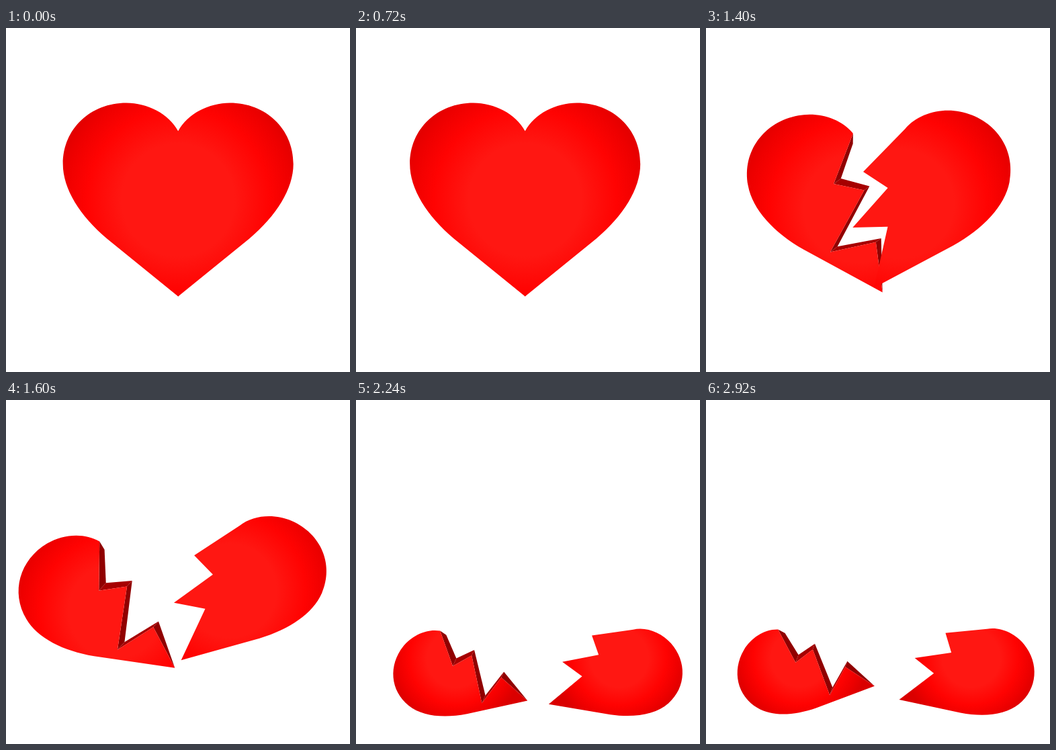
Animation of 512 by 512 pixels, one loop 3.2 s. Source, as an HTML page with a canvas:

```html
<!DOCTYPE html>
<html lang="en">
<head>
<meta charset="utf-8">
<title>Breaking heart</title>
<style>
  html, body { margin: 0; width: 100%; height: 100%; overflow: hidden; background: #fff; }
  canvas { display: block; width: 100vw; height: 100vh; }
</style>
</head>
<body>
<canvas id="stage" width="512" height="512"></canvas>
<script>
const ctx = document.getElementById('stage').getContext('2d');
const LOOP = 3200, STEP = 40, LAST = 2920;
const BREAK = 1120, SPLIT = 480;
const TIP = { x: 256.2, y: 399.5 };
const LOBE = { x: 85, y: -200 };
const ROCK = { half: 285, decay: 0.0035 };

// Shapes are measured from the tip of the heart; cracks run from notch to tip.
// drift, drop, turn and shrink are reached SPLIT ms after the break.
const pieces = [
  {
    side: -1, drift: 76, drop: 85, turn: 30.8, shrink: 0.11, power: 2,
    land: 1768, peak: 1920, swing: 27.3,
    rest: { x: 105, y: 407, lean: 59.6, scale: 0.677 },
    crack: [[0, -246], [-43, -176], [1, -158], [-67, -75], [4, -77], [0, 0]]
  },
  {
    side: 1, drift: 59.5, drop: 55, turn: 23.5, shrink: 0.112, power: 1.4,
    land: 1871, peak: 2062, swing: 17,
    rest: { x: 431, y: 405.5, lean: 52, scale: 0.682 },
    crack: [[0, -246], [-50, -170], [-8.5, -153], [-49.5, -83.5], [2.7, -95], [0, 0]]
  }
];

const lerp = (a, b, k) => a + (b - a) * k;
const clamp = v => Math.max(0, Math.min(1, v));

function halfPath(side, crack) {
  const p = new Path2D(), k = side;
  p.moveTo(0, 0);
  p.lineTo(106 * k, -86);
  p.bezierCurveTo(146 * k, -120, 171.5 * k, -160, 171.5 * k, -197);
  p.bezierCurveTo(171.5 * k, -250, 130 * k, -288, 77 * k, -288);
  p.bezierCurveTo(46 * k, -288, 14 * k, -272, 0, -246);
  crack.forEach(([x, y]) => p.lineTo(x, y));
  p.closePath();
  return p;
}

for (const p of pieces) {
  p.path = halfPath(p.side, p.crack);
  // The unbroken halves overlap a little so that no seam shows.
  p.whole = halfPath(p.side, [[-p.side, -246], [-p.side, -1]]);
}

function glow(x, y, r) {
  const g = ctx.createRadialGradient(x, y, 0, x, y, r);
  g.addColorStop(0.42, '#ff1712');
  g.addColorStop(0.68, '#ff0302');
  g.addColorStop(0.85, '#ee0000');
  g.addColorStop(1, '#da0000');
  return g;
}

function fillPath(path, matrix, paint) {
  const p = new Path2D();
  p.addPath(path, matrix);
  ctx.fillStyle = paint;
  ctx.fill(p);
}

// Two sways, the second one slower and weaker.
function sway(t) {
  const wave = (size, from, period) => -size * Math.sin(2 * Math.PI * (t - from) / period);
  return t < 480 ? wave(13.7, 0, 480) : wave(6.4, 480, 640);
}

function fallPose({ side, drift, drop, turn, shrink, power, rest }, t) {
  const u = (t - BREAK) / SPLIT, spin = u ** power, fall = u ** 3;
  return {
    x: TIP.x + side * (LOBE.x + Math.min(82, drift * spin)),
    y: Math.min(rest.y, TIP.y + LOBE.y + drop * fall),
    lean: turn * spin,
    scale: Math.max(rest.scale, 1 - shrink * fall)
  };
}

// A round lobe rocking on the ground until it settles.
function rockPose({ side, peak, swing, rest }, t) {
  const dt = t - peak;
  const roll = swing * Math.exp(-ROCK.decay * Math.max(0, dt)) * Math.cos(Math.PI * dt / ROCK.half);
  return {
    x: rest.x + side * roll * 1.04,
    y: rest.y + 0.12 * Math.abs(roll),
    lean: rest.lean + roll,
    scale: rest.scale
  };
}

function poseAt(piece, t) {
  const a = fallPose(piece, t), b = rockPose(piece, t), k = clamp((t - piece.land) / 50);
  const pose = {};
  for (const key in a) pose[key] = lerp(a[key], b[key], k);
  return pose;
}

// Cut faces running back from the front edge of the crack; the teeth are thinner.
function drawCut(crack, matrix, { lean, scale }) {
  const grow = clamp(lean / 15);
  const dx = (11 - 0.12 * lean) * scale / 0.68 * grow, dy = -10.5 * grow;
  const front = crack.map(([x, y]) => matrix.transformPoint(new DOMPoint(x, y)));
  const back = front.map((p, i) => {
    const depth = i % 2 ? 1.1 : 0.8;
    return { x: p.x + dx * depth, y: p.y + dy * depth };
  });
  const end = front.length - 1;
  back[0].x += (front[1].x - front[0].x) * 0.28;
  back[0].y += (front[1].y - front[0].y) * 0.28;
  back[end] = front[end];
  for (let i = 0; i < end; i++) {
    ctx.beginPath();
    [front[i], front[i + 1], back[i + 1], back[i]].forEach(p => ctx.lineTo(p.x, p.y));
    ctx.closePath();
    ctx.fillStyle = i % 2 ? '#a60000' : '#900000';
    ctx.fill();
  }
}

function drawPiece(piece, t) {
  const { side, crack, path } = piece;
  const pose = poseAt(piece, t), { x, y, lean, scale } = pose;
  const matrix = new DOMMatrix().translate(x, y).rotate(side * lean).scale(scale)
    .translate(-side * LOBE.x, -LOBE.y);
  if (side < 0) drawCut(crack, matrix, pose);
  const k = (1 - scale) / 0.32;
  const paint = glow(x - side * lerp(85, 35, k), y + lerp(57, -22, k), lerp(200, 102, k));
  fillPath(path, matrix, paint);
}

function draw(t) {
  ctx.fillStyle = '#fff';
  ctx.fillRect(0, 0, 512, 512);
  if (t > BREAK) {
    pieces.forEach(p => drawPiece(p, t));
    return;
  }
  const dx = sway(t);
  const matrix = new DOMMatrix().translate(TIP.x + dx, TIP.y);
  const paint = glow(TIP.x + dx, 256, 200);
  pieces.forEach(p => fillPath(p.whole, matrix, paint));
}

const start = performance.now();
function tick() {
  const t = (performance.now() - start) % LOOP;
  draw(Math.min(LAST, Math.floor(t / STEP) * STEP));
  requestAnimationFrame(tick);
}
tick();
</script>
</body>
</html>
```
